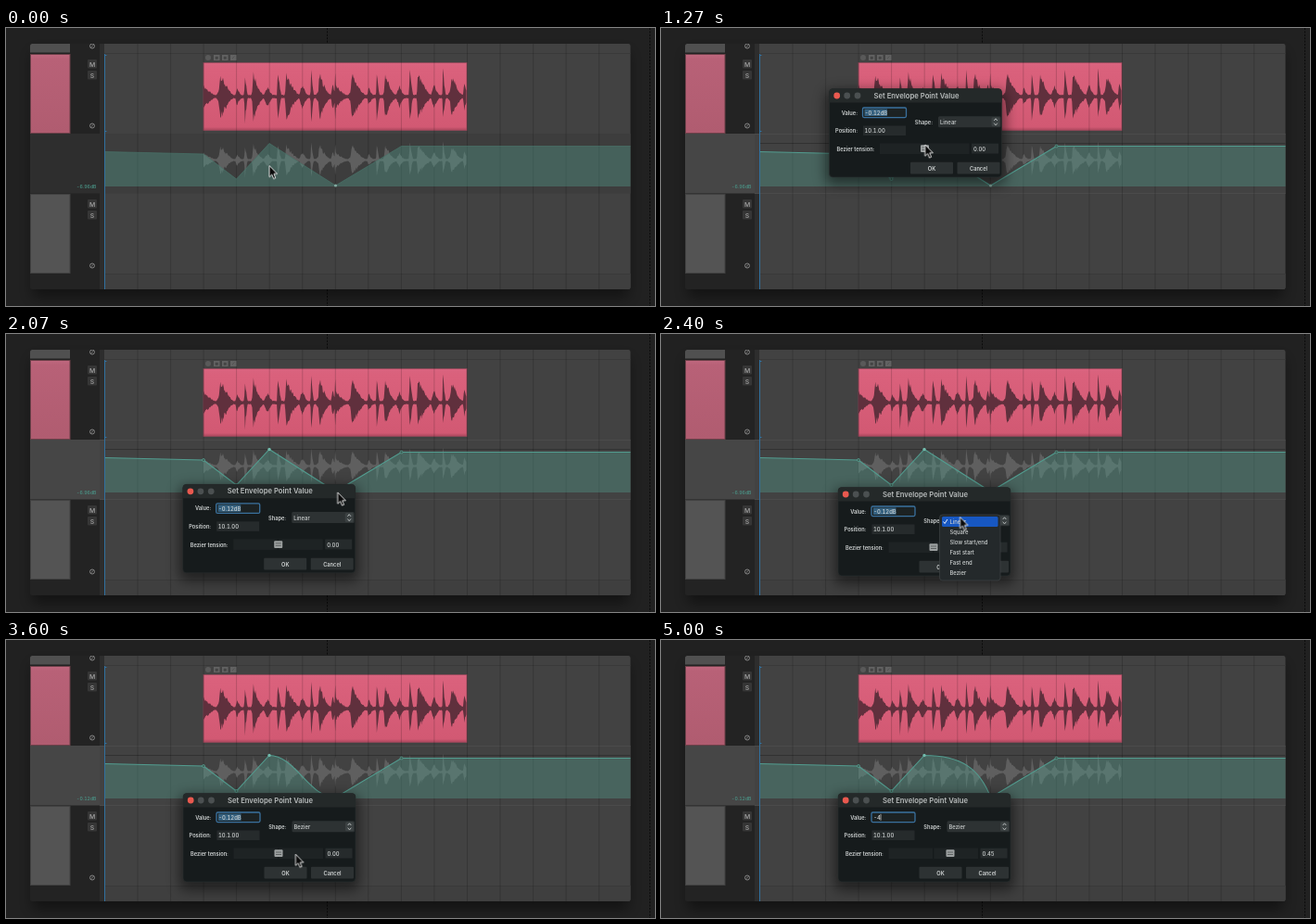
Write an HTML page that moves like this. It is 700 px wide and 300 px high and loops after 5.07 s.

```html
<!DOCTYPE html>
<html lang="en">
<head>
<meta charset="utf-8">
<title>Envelope point editing</title>
<style>
  html, body { margin: 0; width: 100%; height: 100%; overflow: hidden; background: #212121; }
  svg { display: block; width: 100vw; height: 100vh; }
  text { font: 500 5.9px Inter, sans-serif; fill: #cfd3d3; dominant-baseline: central; white-space: pre; }
  .num { font-variant-numeric: tabular-nums; }
  .label { font-size: 5.7px; font-weight: 600; }
  .end { text-anchor: end; }
  .mid { text-anchor: middle; }
  .title { font-size: 7.7px; font-weight: 600; fill: #b9bdbd; }
  .tip { font: 600 6.15px "Noto Sans", sans-serif; fill: #26241c; }
  .level { font-size: 5.2px; fill: #4a9688; text-anchor: end; }
  .key { font-size: 6.8px; fill: #a8a8a8; text-anchor: middle; }
  .field { fill: #262b2c; }
  .button { fill: #2d3233; }
  .fill { fill: #509687; fill-opacity: .4; }
  .line { fill: none; stroke: #529c8f; stroke-width: 1.1; }
  .dot { fill: #3d5750; stroke: #58a596; stroke-width: .7; }
  #dialog { animation: dialog 5070ms infinite; }
  #arrow { animation: arrow 5070ms infinite; }
  @keyframes dialog {
    0%, 36.9% { transform: translate(181.5px, 65.5px); }
    42%, 100% { transform: translate(191px, 165.5px); }
  }
  @keyframes arrow {
    0%, 5.3% { transform: translate(284px, 148.5px); }
    11%, 25% { transform: translate(284.5px, 126px); }
    34.1%, 36.9% { transform: translate(348.5px, 74px); }
    42% { transform: translate(358px, 174px); }
    46%, 48.7% { transform: translate(322.5px, 197.5px); }
    53.3%, 56.6% { transform: translate(328px, 222px); }
    60.6%, 63.1% { transform: translate(333px, 200.5px); }
    67%, 69.6% { transform: translate(326px, 236px); }
    75.5%, 78.5% { transform: translate(291px, 223.5px); }
    80.3% { transform: translate(293px, 223.5px); }
    86.8%, 88.2% { transform: translate(310px, 223.5px); }
    92.7% { transform: translate(252px, 188px); }
    95.7%, 100% { transform: translate(200px, 189px); }
  }
</style>
</head>
<body>
<svg viewBox="0 0 700 300">
  <defs>
    <filter id="soft" x="-20%" y="-30%" width="140%" height="170%"><feGaussianBlur stdDeviation="7"/></filter>
    <linearGradient id="pink" x2="0" y2="1">
      <stop stop-color="#c0687f"/><stop offset=".06" stop-color="#b86177"/><stop offset="1" stop-color="#b05c70"/>
    </linearGradient>
    <linearGradient id="clip" x2="0" y2="1">
      <stop stop-color="#d9647f"/><stop offset=".08" stop-color="#da617c"/><stop offset=".95" stop-color="#d25973"/><stop offset="1" stop-color="#a8465c"/>
    </linearGradient>
    <clipPath id="frame"><rect x="26" y="17" width="647.5" height="265" rx="2.5"/></clipPath>
    <path id="wave"/>
    <g id="phase" fill="none" stroke="#8e8e8e" stroke-width=".9"><circle r="2.5"/><path d="M-1.2 1.2 1.2-1.2"/></g>
    <g id="keys">
      <rect x="88" y="34" width="10" height="9.5" rx="1" fill="#363636"/><text class="key" x="93" y="39">M</text>
      <rect x="88" y="46" width="10" height="9.5" rx="1" fill="#363636"/><text class="key" x="93" y="51">S</text>
      <use href="#phase" x="93" y="105.5"/>
    </g>
  </defs>

  <rect width="700" height="300" fill="#212121"/>
  <path d="M346.5 0V300M694.5 0V300" stroke="#0b0b0b" stroke-dasharray="2 1.4"/>
  <rect x="28" y="26" width="644" height="265" rx="6" fill="#000" opacity=".4" filter="url(#soft)"/>

  <g clip-path="url(#frame)">
    <rect x="26" y="17" width="648" height="265" fill="#232323"/>
    <rect x="101" y="17" width="5" height="265" fill="#2d2d2d"/>
    <rect x="106" y="17" width="568" height="265" fill="#424242"/>
    <rect x="106" y="265" width="568" height="17" fill="#3f3f3f"/>
    <rect x="26" y="17" width="43" height="9.5" fill="#505050"/>
    <rect x="26.5" y="28.5" width="42.5" height="85" fill="url(#pink)" stroke="#6d4049"/>
    <rect x="26.5" y="179.5" width="42.5" height="85" fill="#545454" stroke="#414141"/>
    <path d="M106 27.5h568M106 265.5h568" stroke="#393939"/>
    <use href="#phase" x="93" y="19.5"/>
    <use href="#keys"/>
    <use href="#keys" y="151"/>

    <g data-on="0,860">
      <rect x="26" y="114" width="75" height="64.5" fill="#2e2e2e"/>
      <rect x="106" y="114" width="568" height="64.5" fill="#3d3d3d"/>
    </g>
    <g data-on="860,5070">
      <rect x="26" y="114" width="75" height="64.5" fill="#464646"/>
      <rect x="101" y="114" width="573" height="64.5" fill="#424242"/>
      <path d="M101 114.5h573M101 178.5h573" stroke="#4b4b4b"/>
      <path d="M106 124.5h568" stroke="#313131"/>
    </g>

    <rect x="213" y="37.5" width="284" height="73" fill="url(#clip)" stroke="#93495a" stroke-width=".8"/>
    <path id="grid" stroke="#000" stroke-opacity=".17"/>
    <use href="#wave" transform="translate(213 74) scale(1 35)" fill="#60303d"/>
    <circle cx="218" cy="32" r="3" fill="#595959"/>
    <path d="M224 29h6.5v6h-6.5zM233 29h6.5v6h-6.5zM242 29h6.5v6h-6.5z" fill="#626262"/>
    <path d="M226 31h2.5v2.5h-2.5zM235 31h2.5v2.5h-2.5zM244 33l2.5-2.5" fill="#444" stroke="#444" stroke-width=".5"/>

    <use href="#wave" transform="translate(213 142.5) scale(1 23)" fill="#5f5f5f"/>
    <path id="area" class="fill"/>
    <path id="thin" fill="none" stroke="#487369" stroke-width=".7" data-on="0,860"/>
    <path id="bold" class="line" data-on="860,5070"/>
    <g data-on="860,5070">
      <circle class="dot" cx="213" cy="136" r="1.5"/><circle class="dot" cx="248.5" cy="163" r="1.5"/>
      <circle class="dot" cx="426.5" cy="127.5" r="1.5"/>
      <circle cx="284" cy="124.5" r="1.7" fill="#70b8aa"/>
    </g>
    <circle cx="355.5" cy="170" r="1.6" fill="#83aaa1"/>
    <path d="M106.5 28V282M106 29.5h2.5M106 111.5h2.5" stroke="#31719f" fill="none"/>
    <text class="level num" id="level" x="97.5" y="171"></text>
  </g>

  <g id="dialog" data-on="1060,5070">
    <rect x="-4" y="2" width="194" height="102" rx="7" fill="#000" opacity=".5" filter="url(#soft)"/>
    <rect width="186" height="95.5" rx="4" fill="#161b1c" stroke="#2a2f30" stroke-width=".6"/>
    <path d="M0 15V4a4 4 0 0 1 4-4H182a4 4 0 0 1 4 4V15z" fill="#242929"/>
    <circle cx="8.2" cy="7.5" r="3.4" fill="#e9594f"/>
    <circle cx="19.2" cy="7.5" r="3.4" fill="#4b5051"/><circle cx="30.500" cy="7.5" r="3.4" fill="#4b5051"/>
    <text class="title mid" x="94" y="7.5">Set Envelope Point Value</text>

    <text class="label end" x="30.500" y="25.600">Value:</text>
    <rect class="field" x="36.500" y="20.500" width="46" height="10.500"/>
    <rect id="focus" x="36" y="20.500" width="47" height="10.600" rx="1.500" fill="#1c2223" stroke="#3a719e" stroke-width="1.300"/>
    <rect id="marked" x="38" y="22" width="24.500" height="7.500" fill="#34607f"/>
    <text id="value" class="num" x="38.300" y="25.800"></text>
    <path id="caret" stroke="#ddd" stroke-width=".7"/>

    <text class="label end" x="30.500" y="45.300">Position:</text>
    <rect class="field" x="36.500" y="40" width="46" height="10.500"/>
    <text class="num" x="38" y="45.300">10.1.00</text>

    <text class="label end" x="111.500" y="35.800">Shape:</text>
    <rect class="button" x="117.500" y="29.700" width="67.500" height="12" rx="1.500"/>
    <rect x="175" y="30.700" width="9" height="10" rx="1.500" fill="#3b4142"/>
    <text id="shape" x="119.500" y="35.800"></text>
    <path d="M177.700 34.500l1.800-2.200 1.800 2.200M177.700 37.200l1.800 2.200 1.800-2.200" fill="none" stroke="#c0c4c4" stroke-width=".9"/>

    <text class="label" x="8" y="64.700">Bezier tension:</text>
    <rect x="54.500" y="59" width="96.500" height="11.500" fill="#1e2324"/>
    <path d="M102.700 59v11.500" stroke="#14191a"/>
    <g id="knob">
      <rect x="-4.500" y="60.800" width="9" height="7.800" rx="1" fill="#9da1a1"/>
      <path d="M-3 63.500h6M-3 66h6" stroke="#555a5a" stroke-width=".9"/>
    </g>
    <rect class="field" x="153.500" y="59.200" width="29" height="10.800"/>
    <text id="tension" class="num" x="155.500" y="64.700"></text>

    <rect class="button" x="87.500" y="79.300" width="46" height="12.800" rx="1"/>
    <text class="label mid" x="110.500" y="85.800">OK</text>
    <rect class="button" x="138" y="79.300" width="46" height="12.800" rx="1"/>
    <text class="label mid" x="161" y="85.800">Cancel</text>
  </g>

  <g id="menu" data-on="2330,2790 3195,3520">
    <rect x="300.500" y="195" width="65.500" height="71" rx="3" fill="#24292b" stroke="#44494a" stroke-width=".6"/>
    <rect id="hover" x="303" y="197" width="60.500" height="11" rx="1.500" fill="#1757c2"/>
    <path id="check" d="M304.500 202.500l1.600 2 2.800-4.500" fill="none" stroke="#fff" stroke-width=".9"/>
  </g>

  <g data-on="595,1265">
    <rect x="301.500" y="124.500" width="216.500" height="9.800" fill="#f3ebc8" stroke="#4b4839" stroke-width=".8"/>
    <text class="tip" x="303.200" y="129.300">Freehand draw envelope ignoring snap [-0.12dB at 10.1.00 / 0:12.558]</text>
    <path d="M285 125.500l1.600-4 6.800-6.500 1.500 1.600-6.700 7z" fill="#0a0a0a" stroke="#eee" stroke-width=".7" stroke-linejoin="round"/>
  </g>
  <path id="arrow" data-on="0,595 1265,4920" d="M0 0V12.300L2.800 9.700 4.700 14.200 6.800 13.300 4.900 8.900H8.600Z"
    fill="#0a0a0a" stroke="#f2f2f2" stroke-width=".9" stroke-linejoin="round"/>
</svg>
<script>
  const LOOP = 5070;
  const SHAPES = ['Linear', 'Square', 'Slow start/end', 'Fast start', 'Fast end', 'Bezier'];
  const $ = id => document.getElementById(id);
  const set = (id, attrs) => { for (const k in attrs) $(id).setAttribute(k, attrs[k]); };
  const write = (id, s) => { if ($(id).textContent !== s) $(id).textContent = s; };
  const show = (el, on) => { el.style.visibility = on ? 'visible' : 'hidden'; };
  // Value of the last [time, value] pair already reached.
  const at = (t, steps) => steps.filter(s => s[0] <= t).pop()[1];

  const gridX = Array.from({ length: 15 }, (_, i) => 142 + i * 35.55);
  set('grid', { d: gridX.map(x => `M${x.toFixed(1)} 17V282`).join('') });

  // One drum loop: offset, height, attack, decay of each hit.
  const hits = [
    [0, .4, 1, 17], [18, .8, 3, 18], [18, .36, 6, 13], [36, .3, 3, 8], [44.5, 1, .8, 4],
    [53.5, .9, 1.5, 13], [54, .4, 4, 17], [69, .38, 6, 8], [80, 1, .8, 5], [89, .8, 1.5, 18],
    [106, .45, 4, 9], [116, 1, .8, 4], [125, .8, 2, 15], [126, .4, 7, 17], [139, .5, 2, 6], [142, 1, .8, 3]
  ];
  const noise = n => { const v = Math.sin(n * 12.9898) * 43758.5453; return v - Math.floor(v); };
  const loudness = x => hits.reduce((max, [pos, height, attack, decay]) => {
    const d = x - pos, fall = d < 0 ? 1 + d / attack : 1 - d / decay;
    return Math.max(max, fall > 0 ? height * fall ** 1.7 : 0);
  }, .06);
  const upper = [], lower = [];
  for (let i = 0; i < 406; i++) {
    const x = i * .7, a = loudness(x % 142.2);
    upper.push(`${x.toFixed(1)} ${(-a * (.65 + .35 * noise(i))).toFixed(3)}`);
    lower.unshift(`${x.toFixed(1)} ${(a * (.65 + .35 * noise(i + 500))).toFixed(3)}`);
  }
  set('wave', { d: `M${upper.join('L')}L${lower.join('L')}Z` });

  SHAPES.forEach((name, i) => {
    const label = document.createElementNS('http://www.w3.org/2000/svg', 'text');
    label.setAttribute('x', 311.5);
    label.setAttribute('y', 202.6 + 11 * i);
    label.textContent = name;
    $('menu').append(label);
  });

  const timed = [...document.querySelectorAll('[data-on]')].map(el =>
    [el, el.dataset.on.split(' ').map(span => span.split(',').map(Number))]);

  function segment(shape, tension) {
    if (shape === 'Linear') return 'L355.5 170';
    const k = tension / .45;
    return `C${312 + 12 * k} 124.5 ${327 + 17 * k} ${170 - 31 * k} 355.5 170`;
  }

  function render(t) {
    for (const [el, spans] of timed) show(el, spans.some(([a, b]) => t >= a && t < b));

    const shape = at(t, [[0, 'Linear'], [2790, 'Slow start/end'], [3520, 'Bezier']]);
    const early = Math.min(Math.max((t - 3930) / 140, 0), 1);
    const late = Math.min(Math.max((t - 4070) / 310, 0), 1);
    const tension = .06 * early + .39 * late;
    const curve = `M106 133.5L213 136 248.5 163 284 124.5${segment(shape, tension)}L426.5 127.5H674`;
    set('area', { d: `${curve}V171H106Z` });
    set('thin', { d: curve });
    set('bold', { d: curve });

    write('level', t < 2790 ? '-6.96dB' : '-0.12dB');
    write('shape', shape);
    write('tension', tension.toFixed(2));
    set('knob', { transform: `translate(${103 + 40 * tension} 0)` });

    const open = t >= 1060, typing = t >= 4920;
    write('value', at(t, [[0, '-0.12dB'], [4920, '-'], [4990, '-4']]));
    show($('focus'), open && (t < 3925 || t >= 4725));
    show($('marked'), open && (t < 3925 || (t >= 4790 && !typing)));
    show($('caret'), typing);
    set('caret', { d: `M${t < 4990 ? 42 : 46} 22.3v7` });

    const second = t > 3000;
    const hover = at(t, [[0, 0], [2530, 1], [2600, 2], [3265, 3], [3330, 4], [3395, 5]]);
    set('menu', { transform: `translate(0 ${second ? -22 : 0})` });
    set('hover', { y: 197 + 11 * hover });
    set('check', { transform: `translate(0 ${second ? 22 : 0})` });
  }

  let start;
  function tick(now) {
    start ??= now;
    render((now - start) % LOOP);
    requestAnimationFrame(tick);
  }
  render(0);
  requestAnimationFrame(tick);
</script>
</body>
</html>
```
